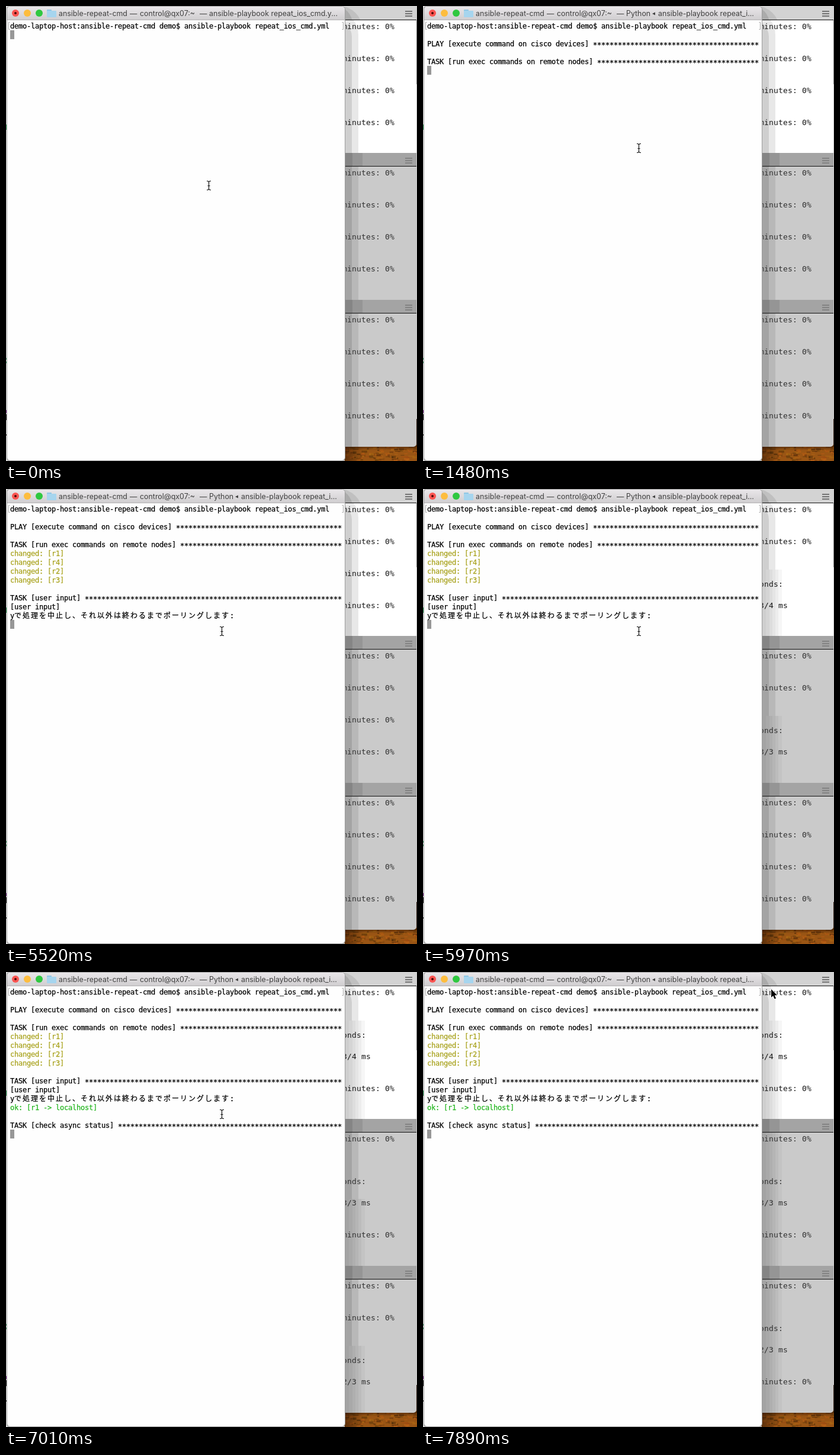
Animation of 694x768 px, one loop 8 s. Source, as an HTML page with a canvas:

```html
<!DOCTYPE html>
<html lang="en">
<head>
<meta charset="utf-8">
<title>Terminal session</title>
<style>
html, body { margin: 0; width: 100%; height: 100%; overflow: hidden; background: #fff; }
canvas { display: block; }
</style>
</head>
<body>
<canvas id="stage" width="694" height="768"></canvas>
<script>
const ctx = document.getElementById('stage').getContext('2d');
const LOOP = 8000;
const MONO = '"DejaVu Sans Mono", monospace';
const CJK = '"Noto Sans CJK JP", "Noto Sans CJK", sans-serif';
const BLACK = '#000', OLIVE = '#a8a21c', GREEN = '#23b61f';

// Last entry whose start time has passed
const at = (steps, t) => steps.filter(s => s[0] <= t).pop();

function rect(x, y, w, h, fill) {
  ctx.fillStyle = fill;
  ctx.fillRect(x, y, w, h);
}

function shape(fill, build) {
  ctx.beginPath();
  build();
  ctx.fillStyle = fill;
  ctx.fill();
}

function clipped(x, y, w, h, draw) {
  ctx.save();
  ctx.beginPath();
  ctx.rect(x, y, w, h);
  ctx.clip();
  draw();
  ctx.restore();
}

function gradient(y0, y1, from, to) {
  const g = ctx.createLinearGradient(0, y0, 0, y1);
  g.addColorStop(0, from);
  g.addColorStop(1, to);
  return g;
}

// Terminal text: one glyph per cell, two cells for wide glyphs
function cells(text, x, y, size, advance, color, weight = 0) {
  ctx.fillStyle = ctx.strokeStyle = color;
  ctx.lineWidth = weight;
  for (const ch of text) {
    const wide = ch > '\u2fff';
    ctx.font = `${size}px ${wide ? CJK : MONO}`;
    const base = y + (ch === '*' ? 2 : 0);
    ctx.fillText(ch, x, base);
    if (weight) ctx.strokeText(ch, x, base);
    x += advance * (wide ? 2 : 1);
  }
}

function seeded(seed) {
  return () => (seed = (seed * 16807) % 2147483647) / 2147483647;
}

function wallpaper() {
  const rnd = seeded(77);
  rect(0, 0, 694, 768, '#c4c4c4');
  rect(572, 740, 122, 28, '#9a5514');
  for (let i = 0; i < 150; i++) {
    const light = 14 + rnd() * 30;
    const x = 568 + rnd() * 126, y = 742 + rnd() * 24;
    rect(x, y, 2 + rnd() * 8, 1 + rnd() * 3, `hsla(${24 + rnd() * 12}, 80%, ${light}%, .6)`);
  }
  rect(572, 742, 122, 8, gradient(742, 750, 'rgba(40,15,0,.65)', 'rgba(40,15,0,0)'));
  const side = ctx.createLinearGradient(572, 0, 604, 0);
  side.addColorStop(0, 'rgba(30,10,0,.5)');
  side.addColorStop(1, 'rgba(30,10,0,0)');
  rect(572, 744, 32, 24, side);
  rect(693, 24, 1, 108, '#777');
  rect(693, 697, 1, 46, '#2a1a10');
}

function leftEdge() {
  rect(0, 0, 2, 768, '#dedede');
  rect(1, 2, 1, 764, '#b0b0b0');
  rect(0, 200, 2, 9, '#2f9a58');
  rect(0, 594, 2, 3, '#4aa070');
  rect(0, 600, 1, 3, '#4aa070');
  rect(0, 682, 2, 5, '#7b2b8c');
  rect(0, 689, 1, 10, '#222');
  rect(0, 723, 2, 2, '#222');
}

const coarse = [[595, 8, 40, .09], [584, 22, 30, .11]];
const titleBands = [[602, 0, 40, .09], [585, 0, 30, .11]];
const fine = [606, 600, 595, 590, 585, 579].map((x, i) => [x, 4 + i * 4, 38, .034]);

function shadow(y0, y1, bands) {
  clipped(572, y0, 121, y1 - y0, () => {
    for (const [edge, top, radius, alpha] of bands)
      shape(`rgba(0,0,0,${alpha})`, () => ctx.roundRect(400, top, edge - 400, 900, radius));
  });
}

// Each pane: top, colours, and the times its router output scrolls
const panes = [
  { top: 0, body: '#fff', bar: '#d3d3d3', ink: '#161616', icon: '#747474', offset: 39, ping: '3/4 ms', out: 5970, scroll: 7010 },
  { top: 248, body: '#cacaca', bar: '#a4a4a4', ink: '#303030', icon: '#838383', offset: 286, ping: '3/3 ms', out: 5970, scroll: 7010 },
  { top: 496, body: '#cacaca', bar: '#a4a4a4', ink: '#303030', icon: '#838383', offset: 534, ping: '2/3 ms', out: 6120, scroll: 7150 }
];
const USAGE = 'minutes: 0%', DELAY = 'onds:';

function paneRows(p, t) {
  if (t < p.out) return [[0, USAGE], [54, USAGE], [108, USAGE], [162, USAGE]];
  if (t < p.scroll) return [[0, USAGE], [54, USAGE], [126, DELAY], [162, p.ping]];
  return [[0, USAGE], [72, DELAY], [108, p.ping], [162, USAGE]];
}

function pane(p, t) {
  const line = p.top + (p.top ? 22 : 23), bottom = p.top + (p.top ? 248 : 248);
  shape(p.body, () => ctx.roundRect(560, p.top, 133, bottom - p.top, [0, 0, p.top === 496 ? 5 : 0, 0]));
  rect(560, p.top, 133, line - p.top, p.bar);

  let split = bottom;
  if (t >= p.out) split = p.offset + 97;
  if (t >= p.scroll && !p.top) split = 82;
  if (t >= 7150 && p.top) split = line;
  shadow(p.top, line, titleBands);
  shadow(line, split, coarse);
  shadow(split, bottom, fine);

  rect(560, line, 133, 1, '#111');
  for (let i = 0; i < 3; i++) rect(674, p.top + 8 + i * 4, 12, 2, p.icon);
  for (const [dy, text] of paneRows(p, t)) cells(text, 568, p.offset + dy, 13, 8, p.ink);
}

function titleText(t) {
  ctx.font = '12.4px Inter, sans-serif';
  ctx.fillStyle = '#404040';
  const put = (text, x) => ctx.fillText(text, x, 17);
  put('ansible-repeat-cmd', 89);
  put('—', 209);
  put('control@qx07:~', 226);
  put('—', 327);
  if (t < 1190) return put('ansible-playbook repeat_ios_cmd.y...', 343);
  put(t >= 4330 && t < 5520 ? 'python' : 'Python', 343);
  put('ansible-playbook repeat_i...', 397);
  shape('#404040', () => {
    ctx.moveTo(387, 13);
    ctx.lineTo(392, 10.5);
    ctx.lineTo(392, 15.5);
  });
}

function titleBar(t) {
  shape(gradient(1, 23, '#e9e6e9', '#d0ced0'), () => ctx.roundRect(2, 1, 570, 22, [5, 5, 0, 0]));
  rect(2, 23, 570, 1, '#b3b1b3');
  const dot = (x, r, color) => shape(color, () => ctx.arc(x, 12, r, 0, 7));
  dot(16, 6, '#fb5552');
  dot(16, 2, '#4d0a08');
  dot(36, 6, '#fdbd3e');
  dot(56, 6, '#2fc840');
  shape('#8fc7e4', () => ctx.roundRect(69, 6, 8, 5, 1));
  shape('#a6d5ee', () => ctx.roundRect(69, 8, 16, 11, 1));
  titleText(t);
}

const starred = text => (text + ' ').padEnd(80, '*');
const output = [
  [0, 0, 'demo-laptop-host:ansible-repeat-cmd demo$ ansible-playbook repeat_ios_cmd.yml', BLACK],
  [1040, 2, starred('PLAY [execute command on cisco devices]'), BLACK],
  [1040, 4, starred('TASK [run exec commands on remote nodes]'), BLACK],
  ...['r1', 'r4', 'r2', 'r3'].map((host, i) => [5520, 5 + i, `changed: [${host}]`, OLIVE]),
  [5520, 10, starred('TASK [user input]'), BLACK],
  [5520, 11, '[user input]', BLACK],
  [5520, 12, 'yで処理を中止し、それ以外は終わるまでポーリングします:', BLACK],
  [6720, 13, '^M', BLACK, 6860],
  [6860, 13, 'ok: [r1 -> localhost]', GREEN],
  [6860, 15, starred('TASK [check async status]'), BLACK]
];
// time, row, column
const caret = [[0, 1, 0], [1040, 5, 0], [5520, 13, 0], [6720, 13, 2], [6860, 16, 0]];

function bracket(x, dir) {
  ctx.strokeStyle = '#a8a8a8';
  ctx.lineWidth = 1;
  ctx.beginPath();
  ctx.moveTo(x + 2 * dir, 27.5);
  ctx.lineTo(x, 27.5);
  ctx.lineTo(x, 39.5);
  ctx.lineTo(x + 2 * dir, 39.5);
  ctx.stroke();
}

function terminal(t) {
  shape('#9c9c9c', () => ctx.roundRect(1, 0, 572, 768, 6));
  shape('#fefefe', () => ctx.roundRect(2, 1, 570, 766, 5));
  titleBar(t);
  bracket(4.5, 1);
  bracket(569.5, -1);
  const [, row, col] = at(caret, t);
  rect(7 + col * 7, 26 + row * 15, 7, 15, '#979797');
  for (const [start, line, text, color, end = LOOP] of output)
    if (t >= start && t < end) cells(text, 7, 38 + line * 15, 12, 7, color, .25);
}

// time, stem x, top y
const pointer = [
  [0, 342, 295], [740, 387, 145], [890, 403, 119], [1330, 402, 125], [1480, 364, 232],
  [7150, 404, 202], [7300, 461, 162], [7440, 483, 130], [7590, 551, 51]
];

function beam(x, y) {
  ctx.beginPath();
  ctx.moveTo(x - 3, y + .5);
  ctx.lineTo(x - 1, y + .5);
  ctx.lineTo(x + .5, y + 2);
  ctx.lineTo(x + 2, y + .5);
  ctx.lineTo(x + 4, y + .5);
  ctx.moveTo(x + .5, y + 2);
  ctx.lineTo(x + .5, y + 14);
  ctx.moveTo(x - 3, y + 15.5);
  ctx.lineTo(x - 1, y + 15.5);
  ctx.lineTo(x + .5, y + 14);
  ctx.lineTo(x + 2, y + 15.5);
  ctx.lineTo(x + 4, y + 15.5);
  ctx.moveTo(x - 1.5, y + 8.5);
  ctx.lineTo(x + 2.5, y + 8.5);
  ctx.strokeStyle = '#111';
  ctx.lineWidth = 1.2;
  ctx.stroke();
}

function arrow(x, y) {
  ctx.beginPath();
  [[0, 0], [0, 14], [3.2, 11], [5.6, 16.6], [8, 15.6], [5.7, 10.2], [10, 10.2]]
    .forEach(([dx, dy]) => ctx.lineTo(x + dx, y + dy));
  ctx.closePath();
  ctx.lineJoin = 'round';
  ctx.lineWidth = 2;
  ctx.strokeStyle = '#fff';
  ctx.stroke();
  ctx.fillStyle = '#000';
  ctx.fill();
}

function draw(t) {
  wallpaper();
  for (const p of panes) pane(p, t);
  leftEdge();
  terminal(t);
  if (t >= 7890) arrow(588, 29);
  else beam(...at(pointer, t).slice(1));
}

const start = performance.now();
function tick() {
  draw((performance.now() - start) % LOOP);
  requestAnimationFrame(tick);
}
tick();
</script>
</body>
</html>
```
